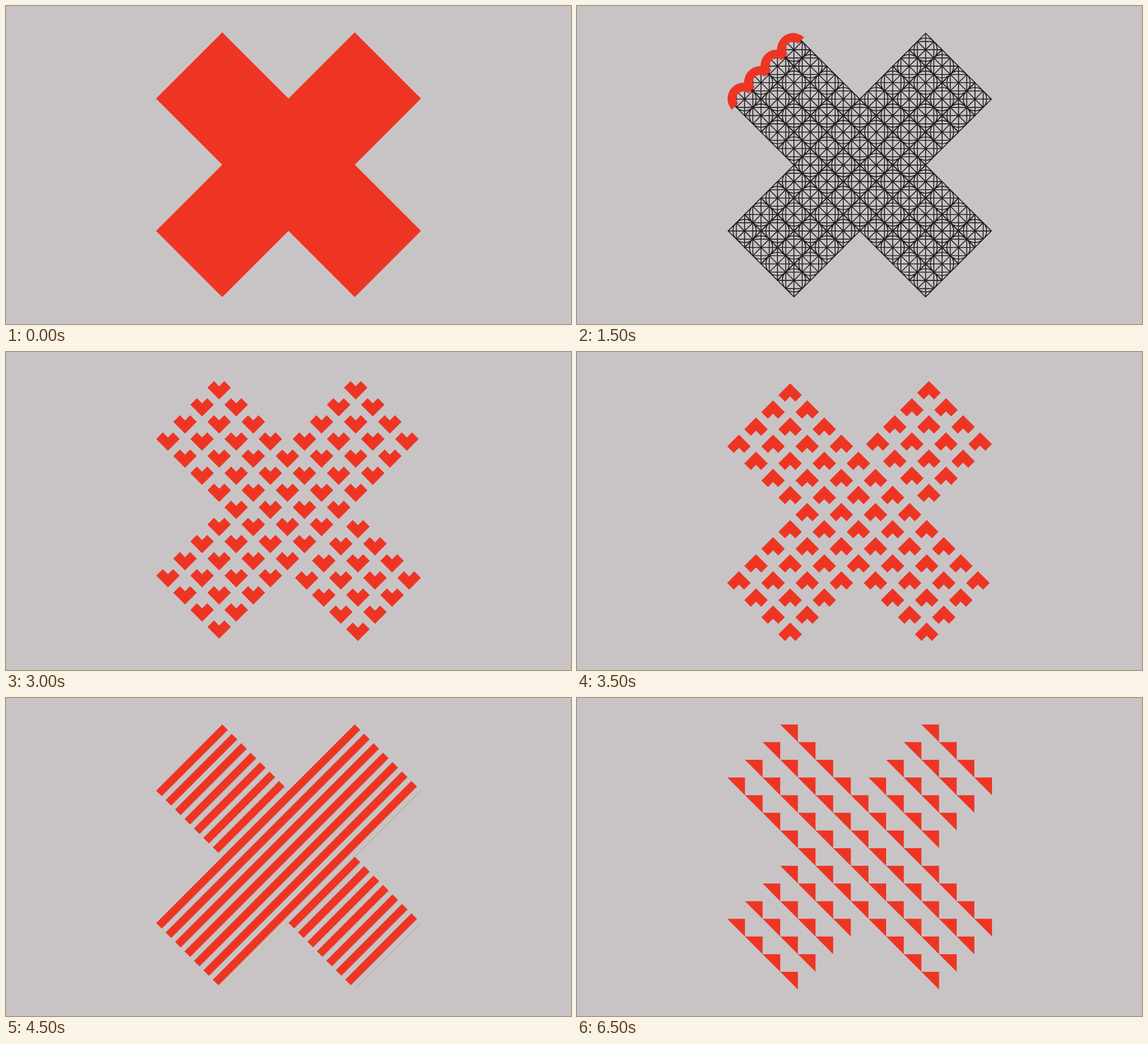
Write an HTML page without scripts that moves like this. It is 998x561 px and loops after 7000 ms.

```html
<!DOCTYPE html>
<html lang="en">
<head>
<meta charset="utf-8">
<title>Cross patterns</title>
<style>
  html, body { margin: 0; width: 100%; height: 100%; overflow: hidden; background: #c8c4c5; }
  svg { display: block; width: 100%; height: 100%; fill: #ee3524; }

  /* --t is the half-second slot in which a scene appears */
  .scene {
    visibility: hidden;
    animation: one 7s step-end infinite;
    animation-delay: calc((var(--t) - 14) * .5s);
  }
  .two { animation-name: two; }
  .four { animation-name: four; }
  @keyframes one { 0% { visibility: visible } 7.142857%, 100% { visibility: hidden } }
  @keyframes two { 0% { visibility: visible } 14.285714%, 100% { visibility: hidden } }
  @keyframes four { 0% { visibility: visible } 28.571429%, 100% { visibility: hidden } }

  /* each motif is drawn for a lattice step of 1 */
  .cell { d: var(--motif); }
  .grid {
    --motif: path("M0 -1L1 0L0 1L-1 0Z M-1 0H1 M0 -1V1 M-.5 -.5H.5V.5H-.5Z M-.5 -.5L.5 .5 M.5 -.5L-.5 .5 M-.707 0A.707 .707 0 0 1 .707 0A.707 .707 0 0 1 -.707 0Z");
    fill: none;
    stroke: #231f20;
    stroke-width: .056;
  }
  .arc { --motif: path("M-.691 .691A.978 .978 0 0 1 .691 -.691L.308 -.308A.436 .436 0 0 0 -.308 .308Z"); }
  .heart { --motif: path("M0 .302L.302 0L.688 .386L0 1.074L-.688 .386L-.302 0Z"); }
  .disc { --motif: path("M-.6 0A.6 .6 0 0 1 .6 0A.6 .6 0 0 1 -.6 0Z"); }
  .flag { --motif: path("M0 0L1.46 -.515L.99 .36L1.31 .68L1 .99Z"); }
  .tri { --motif: path("M0 0H1V1Z"); }

  .bars { fill: none; stroke: #ee3524; stroke-width: 14; stroke-linecap: round; }
</style>
</head>
<body>
<svg viewBox="0 0 998 561" preserveAspectRatio="none">
  <defs>
    <!-- cell, row of 4, block of 4 x 4, cross of 5 blocks -->
    <path id="cell" class="cell"/>
    <g id="row">
      <use href="#cell"/>
      <use href="#cell" x="-1" y="1"/>
      <use href="#cell" x="-2" y="2"/>
      <use href="#cell" x="-3" y="3"/>
    </g>
    <g id="block">
      <use href="#row"/>
      <use href="#row" x="1" y="1"/>
      <use href="#row" x="2" y="2"/>
      <use href="#row" x="3" y="3"/>
    </g>
    <g id="arms">
      <use href="#block"/>
      <use href="#block" x="8"/>
      <use href="#block" x="4" y="4"/>
      <use href="#block" y="8"/>
    </g>
    <g id="cross">
      <use href="#arms"/>
      <use href="#block" x="8" y="8"/>
    </g>

    <path id="solid" d="M382 46.5L499 163.3L616 46.5L733 163.3L616 280L733 396.8L616 513.6L499 396.8L382 513.6L265 396.8L382 280L265 163.3Z"/>

    <g id="hearts" class="heart" transform="translate(376.5 51.3) scale(30.15)">
      <use href="#arms"/>
      <use href="#block" x="8.13" y="8.13"/>
    </g>
    <g id="flags" class="flag" transform="translate(356 62) scale(30.2)">
      <use href="#cross"/>
    </g>

    <path id="short" d="M387 58.7l-110.5 110.5"/>
    <g id="shorts">
      <use href="#short"/>
      <use href="#short" x="17.65" y="17.65"/>
      <use href="#short" x="35.3" y="35.3"/>
      <use href="#short" x="52.95" y="52.95"/>
      <use href="#short" x="70.6" y="70.6"/>
      <use href="#short" x="88.25" y="88.25"/>
      <use href="#short" x="105.9" y="105.9"/>
    </g>
    <path id="long" d="M631.7 61.2l-352.8 352.8"/>

    <pattern id="stripes" width="23.6" height="10" patternUnits="userSpaceOnUse"
             patternTransform="translate(382 46.5) rotate(45)">
      <rect width="10" height="14" transform="rotate(-90) translate(-14 0)" visibility="hidden"/>
      <rect width="23.6" height="10" fill="none"/>
      <rect width="14" height="10"/>
    </pattern>
  </defs>

  <use class="scene" style="--t:0" href="#solid"/>

  <g class="scene four grid" style="--t:1" transform="translate(383.2 77.1) scale(29.07)">
    <use href="#cross"/>
  </g>

  <!-- arcs: one, a row, all -->
  <g class="arc" transform="translate(381.1 75.5) scale(29.15)">
    <use class="scene" style="--t:2" href="#cell" x="-3" y="3"/>
    <use class="scene" style="--t:3" href="#row"/>
    <use class="scene two" style="--t:4" href="#cross"/>
  </g>

  <use class="scene" style="--t:6" href="#hearts"/>
  <g class="scene" style="--t:7" transform="translate(0 561) scale(1 -1)">
    <use href="#hearts"/>
  </g>

  <g class="scene bars" style="--t:8">
    <use href="#shorts"/>
    <use href="#long"/>
    <use href="#long" x="17.65" y="17.65"/>
    <use href="#long" x="35.3" y="35.3"/>
    <use href="#long" x="52.95" y="52.95"/>
    <use href="#long" x="70.6" y="70.6"/>
    <use href="#long" x="88.25" y="88.25"/>
    <use href="#shorts" x="229.7" y="229.9"/>
  </g>
  <use class="scene" style="--t:9" href="#solid" fill="url(#stripes)"/>

  <g class="scene disc" style="--t:10" transform="translate(382.2 75.7) scale(29.2)">
    <use href="#cross"/>
  </g>

  <use class="scene" style="--t:11" href="#flags"/>
  <g class="scene" style="--t:12" transform="rotate(180 499 280.2)">
    <use href="#flags"/>
  </g>

  <g class="scene tri" style="--t:13" transform="translate(359 46.7) scale(31.17)">
    <use href="#cross"/>
  </g>
</svg>
</body>
</html>
```
